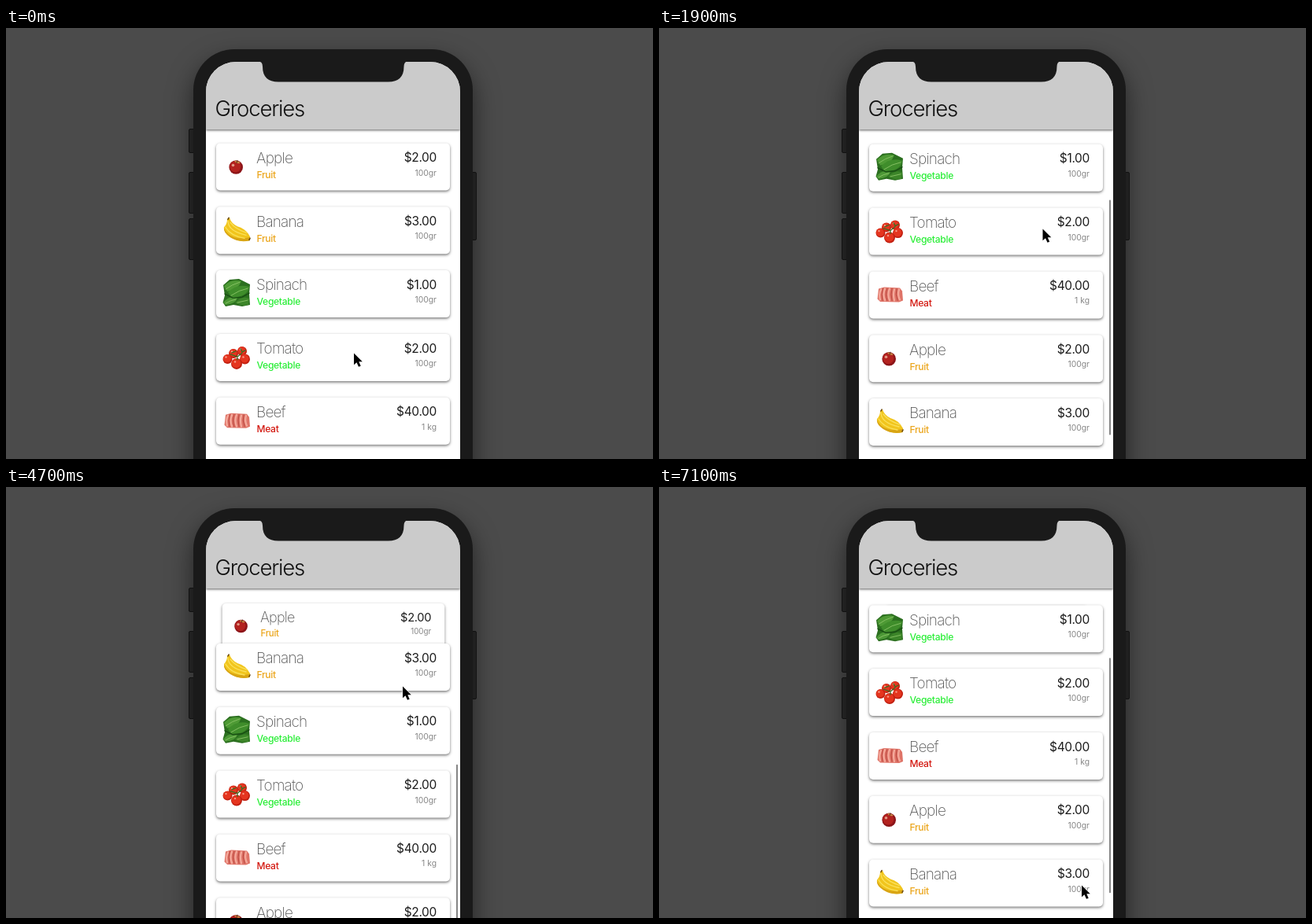
Write an HTML page that moves like this. It is 822 px wide and 548 px high and loops after 7200 ms.

```html
<!DOCTYPE html>
<html lang="en">
<head>
<meta charset="utf-8">
<title>Groceries</title>
<style>
  html, body { margin: 0; width: 100%; height: 100%; overflow: hidden; background: #4b4b4b; }
  #stage { position: relative; width: 822px; height: 548px; overflow: hidden; background: #4b4b4b; }
  #stage div, #stage svg { position: absolute; box-sizing: border-box; }
  text { font-family: Inter, Roboto, sans-serif; font-optical-sizing: none; }
  .key { background: #2b2b2b; border: 1.5px solid #171717; border-radius: 2px; }
  .body { left: 238px; top: 27px; width: 355px; height: 740px; border-radius: 52px; background: #1a1a1a; box-shadow: 0 14px 32px rgba(0,0,0,.55); }
  .screen { left: 254px; top: 42.5px; width: 323px; height: 700px; border-radius: 38px; background: #fff; overflow: hidden; }
  .header { left: 0; top: 0; width: 323px; height: 86.5px; background: #cbcbcb; box-shadow: 0 1px 3px rgba(0,0,0,.65); }
  .card { left: 12.5px; top: 0; width: 297.5px; height: 60.5px; border-radius: 5px; background: #fff; box-shadow: 0 1.5px 3.5px rgba(0,0,0,.55); }
  .card svg { left: 0; top: 0; overflow: visible; }
  #bar { left: 317.7px; top: 0; width: 2.6px; height: 299px; border-radius: 2px; background: #858585; }
  .over { left: 0; top: 0; }
  .title { font-size: 27.56px; font-weight: 300; letter-spacing: -.044em; fill: #111; }
  .name { font-size: 18.95px; font-weight: 200; letter-spacing: -.042em; fill: #555; }
  .kind { font-size: 12.05px; font-weight: 500; letter-spacing: -.024em; }
  .price { font-size: 15.5px; font-weight: 400; letter-spacing: -.022em; fill: #1c1c1c; text-anchor: end; }
  .unit { font-size: 10.34px; font-weight: 400; fill: #858585; text-anchor: end; }
</style>
</head>
<body>
<div id="stage">
  <div class="key" style="left:232px;top:128px;width:9px;height:31px"></div>
  <div class="key" style="left:232px;top:182.5px;width:9px;height:53px"></div>
  <div class="key" style="left:232px;top:241.5px;width:9px;height:53.5px"></div>
  <div class="key" style="left:589px;top:182.5px;width:9px;height:87.5px"></div>
  <div class="body"></div>
  <div class="screen">
    <div id="list"></div>
    <div id="bar"></div>
    <div class="header"></div>
  </div>
  <svg class="over" width="822" height="548">
    <path fill="#1a1a1a" d="M320 42Q326 42.5 326 49Q326 68.500 346 68.500H485.500Q505.500 68.500 505.500 49Q505.500 42.500 511.500 42Z"/>
    <text class="title" x="265.600" y="112.300">Groceries</text>
    <path id="cursor" d="M0 0V14.800L3.500 11.700L6 17.300L8.700 16.200L6.300 10.700H10.800Z"
      fill="#000" stroke="#fff" stroke-width="1.200" stroke-linejoin="round" paint-order="stroke"/>
  </svg>
</div>
<script>
const LOOP = 7200, STEP = 100, PITCH = 80.8, TOP = 103.5, SHRINK = .00182;

const path = (d, fill, extra = '') => `<path d="${d}" fill="${fill}" ${extra}/>`;
const ball = (x, y, r, fill) => `<circle cx="${x}" cy="${y}" r="${r}" fill="${fill}"/>`;
const line = (d, color, w) => path(d, 'none', `stroke="${color}" stroke-width="${w}" stroke-linecap="round"`);

const tomato = ([x, y, r]) =>
  ball(x, y, r, '#c22011') + ball(x - .5, y - .7, r * .82, '#e5351f') + ball(x - 2, y - 2.5, 1.2, '#f8a08c');

const art = {
  apple: ball(25.2, 30.5, 8.8, '#8d1519') + ball(24.3, 29.8, 7, '#b3221f') +
    path('M23 23Q26 21 31 25Q27 27 23 23Z', '#c98a45') + ball(21.5, 28, 1.8, '#e39a86') +
    line('M26 25L27 22', '#4d2413', 1),
  banana: path('M14 15.500L17 14Q19 21 27 25Q38 28 43 38L42.500 43Q29 46 18 38Q9 32 10 26Q14 22 14 15.500Z', '#f1c51d') +
    path('M10 27Q14 38 29 40Q38 40 43 38.500L42.500 43Q29 46 18 39Q9 33 10 27Z', '#d9a514') +
    line('M15 18Q15 31 38 36M12 26Q18 37 36 40M18 20Q25 29 39 33', '#fae05a', 1.3) +
    line('M15 16L16 14M42 42L43 40', '#6b4a14', 1.6),
  spinach: path('M9 19L17 12L29 11L37 15L43 18L42 30L43 44L33 46L22 44L12 46L8.500 41L11 32Z', '#2b6f1f') +
    path('M10 20Q19 10 32 14Q28 25 14 27Z', '#4e9a35') +
    path('M15 28Q27 16 42 21Q40 34 20 35Z', '#3f8d2b') +
    path('M9 41Q17 31 27 35Q25 43 12 44Z', '#4c9836') +
    path('M24 41Q34 31 42 36L41 44Q32 46 24 41Z', '#3c8529') +
    line('M12 24Q20 18 30 15M19 32Q29 25 40 23M12 42Q18 38 25 37M27 41L40 38', '#8cc568', .9) +
    line('M11 30L21 35L33 34L42 29', '#174d12', 1.4),
  tomato: [[33, 22, 6], [22, 25, 6], [14.5, 32, 6], [36.5, 32, 6.5], [26, 38, 7]].map(tomato).join('') +
    line('M18 26L27 29L33 24M27 29L27 33M31 19L33 23L37 21M20 24L25 22', '#3d6d22', 1.3),
  beef: path('M12 22L19 20L39 21L42 25L43 37L38 39L14 38.500L10.500 35Z', '#df7468') +
    line('M15 23Q12 29 14 36M20 22Q17 29 20 37M26 22Q23 29 26 37M32 23Q30 29 32 37M38 23Q36 30 39 36', '#f4aa9c', 2.2) +
    line('M17.500 22Q15 29 17 37M23 22Q20 29 23 37M29 22Q27 29 29 37M35 22Q33 29 36 37', '#b9473e', 1)
};

const kinds = { Fruit: '#eba51a', Vegetable: '#2bee38', Meat: '#d3170f' };
const goods = [
  ['Apple', 'Fruit', '$2.00', '100gr'],
  ['Banana', 'Fruit', '$3.00', '100gr'],
  ['Spinach', 'Vegetable', '$1.00', '100gr'],
  ['Tomato', 'Vegetable', '$2.00', '100gr'],
  ['Beef', 'Meat', '$40.00', '1 kg']
];

const list = document.getElementById('list');
const bar = document.getElementById('bar');
const cursor = document.getElementById('cursor');

const cards = Array.from({ length: 15 }, (_, i) => {
  const [name, kind, price, unit] = goods[i % goods.length];
  const card = document.createElement('div');
  card.className = 'card';
  card.innerHTML = `<svg width="298" height="61">${art[name.toLowerCase()]}
    <text class="name" x="51" y="25.400">${name}</text>
    <text class="kind" x="51.500" y="44.400" fill="${kinds[kind]}">${kind}</text>
    <text class="price" x="280" y="23.700">${price}</text>
    <text class="unit" x="280" y="41">${unit}</text></svg>`;
  list.append(card);
  return card;
});

// Keys are [time, value, ...]
const scroll = [[0, 0], [500, 0], [800, 16], [1400, 73.3], [1900, 160.3], [2200, 207], [2400, 226],
  [2600, 229.9], [3200, 230], [3700, 271], [4200, 370], [4500, 415], [4700, 432.3], [5000, 441],
  [5500, 441], [6300, 313.2], [7100, 157.8]];
const pointer = [[0, 442, 413.5], [500, 443, 422], [800, 448, 406], [1400, 463.5, 348.5], [1900, 487.5, 255.5],
  [2200, 492, 225], [2400, 491, 235], [2900, 485, 413], [3200, 484.5, 413.5], [3700, 489, 372],
  [4200, 498, 270], [4500, 503, 245], [4700, 504, 253.5], [5000, 504, 262], [5500, 505, 260],
  [6300, 517, 387], [7100, 537, 506.5]];
const fade = [[0, 0], [400, 0], [600, 1], [2600, 1], [2900, 0], [3200, 0], [3400, 1], [7100, 1]];

// Monotone cubic interpolation
function sample(keys, t, c = 1) {
  const last = keys.length - 1;
  if (t >= keys[last][0]) return keys[last][c];
  const i = keys.findIndex(k => k[0] > t) - 1;
  const slope = j => (keys[j + 1][c] - keys[j][c]) / (keys[j + 1][0] - keys[j][0]);
  const tangent = j => {
    if (j === 0 || j === last) return slope(j ? j - 1 : 0);
    const a = slope(j - 1), b = slope(j);
    return a * b > 0 ? 2 * a * b / (a + b) : 0;
  };
  const h = keys[i + 1][0] - keys[i][0], u = (t - keys[i][0]) / h, v = 1 - u;
  return keys[i][c] * v * v * (1 + 2 * u) + keys[i + 1][c] * u * u * (3 - 2 * u) +
    h * u * v * (v * tangent(i) - u * tangent(i + 1));
}

function draw(t) {
  const s = sample(scroll, t);
  cards.forEach((card, i) => {
    const y = i * PITCH - s;
    const past = Math.min(Math.max(-y, 0), PITCH);
    card.style.transform = `translateY(${TOP + Math.max(y, 0)}px) scale(${1 - past * SHRINK})`;
  });
  bar.style.transform = `translateY(${96.3 + s * .494}px)`;
  bar.style.opacity = sample(fade, t);
  cursor.setAttribute('transform', `translate(${sample(pointer, t)} ${sample(pointer, t, 2)})`);
}

const start = performance.now();
function tick() {
  const t = (performance.now() - start) % LOOP;
  draw(Math.floor(t / STEP) * STEP);
  requestAnimationFrame(tick);
}
tick();
</script>
</body>
</html>
```
